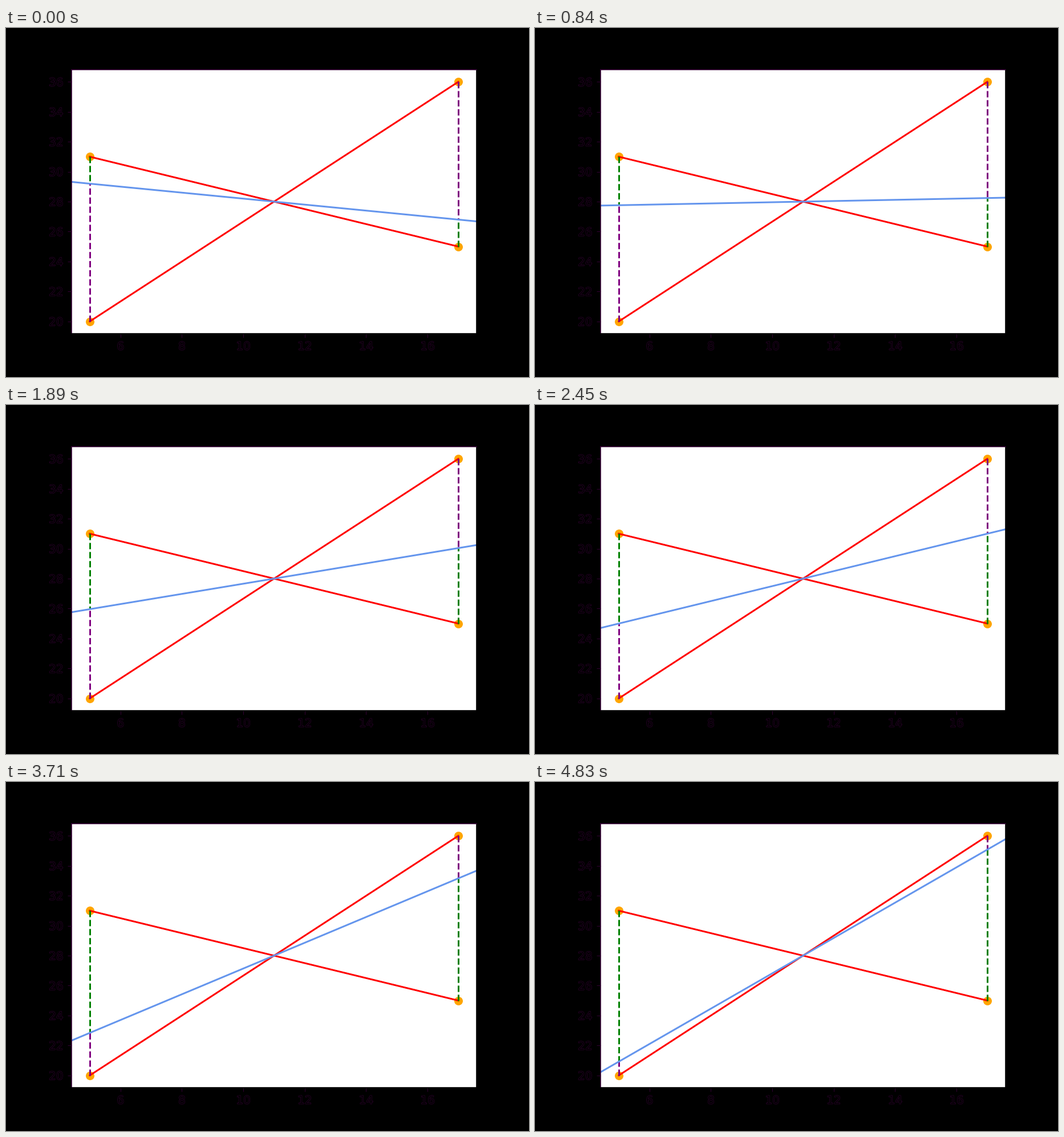
A matplotlib script for the animation above (4.9 s loop, 917x611 px).

```python
import matplotlib.pyplot as plt
from matplotlib import patheffects
from matplotlib.animation import FuncAnimation

DPI = 144
FRAMES, INTERVAL = 70, 70
PIVOT = (11, 28)
X_LEFT, X_RIGHT = 5, 17
X_LIM, Y_LIM = (4.4, 17.6), (19.2, 36.8)
FRINGE = "#330033"

# Each residual: x, y of its point, and colour
RESIDUALS = [
    (X_LEFT, 31, "green"),
    (X_RIGHT, 25, "green"),
    (X_LEFT, 20, "purple"),
    (X_RIGHT, 36, "purple"),
]


def fit(x, slope):
    return PIVOT[1] + slope * (x - PIVOT[0])


def style_axes(ax):
    ax.set(xlim=X_LIM, ylim=Y_LIM,
           xticks=range(6, 17, 2), yticks=range(20, 37, 2))
    ax.set_facecolor("white")
    for side, spine in ax.spines.items():
        spine.set_color(FRINGE if side in ("left", "top") else "black")
    ax.tick_params(color=FRINGE, width=0.5, labelcolor="black", labelsize=10)
    # Black digits with a faint rim against the black background
    rim = [patheffects.Stroke(linewidth=0.6, foreground=FRINGE),
           patheffects.Normal()]
    for label in ax.get_xticklabels() + ax.get_yticklabels():
        label.set_path_effects(rim)


plt.rcParams["font.family"] = "DejaVu Sans"
fig = plt.figure(figsize=(917 / DPI, 611 / DPI), dpi=DPI, facecolor="black")
fig.subplots_adjust(left=0.125, right=0.9, bottom=0.125, top=0.88)
ax = fig.add_subplot()
style_axes(ax)

ax.scatter([r[0] for r in RESIDUALS], [r[1] for r in RESIDUALS],
           color="orange", s=36, linewidths=1.5, zorder=1)
for ends in ((31, 25), (20, 36)):
    ax.plot((X_LEFT, X_RIGHT), ends, color="red", lw=1.5)

dashes = [ax.plot([], [], "--", color=color, lw=1.5)[0]
          for _, _, color in RESIDUALS]
line, = ax.plot([], [], color="cornflowerblue", lw=1.5)


def update(i):
    slope = -0.2 + 0.02 * i
    line.set_data(X_LIM, [fit(x, slope) for x in X_LIM])
    for dash, (x, y, _) in zip(dashes, RESIDUALS):
        dash.set_data([x, x], [y, fit(x, slope)])
    return [line, *dashes]


anim = FuncAnimation(fig, update, frames=FRAMES, interval=INTERVAL,
                     repeat=True, repeat_delay=0, blit=False)
plt.show()
```
